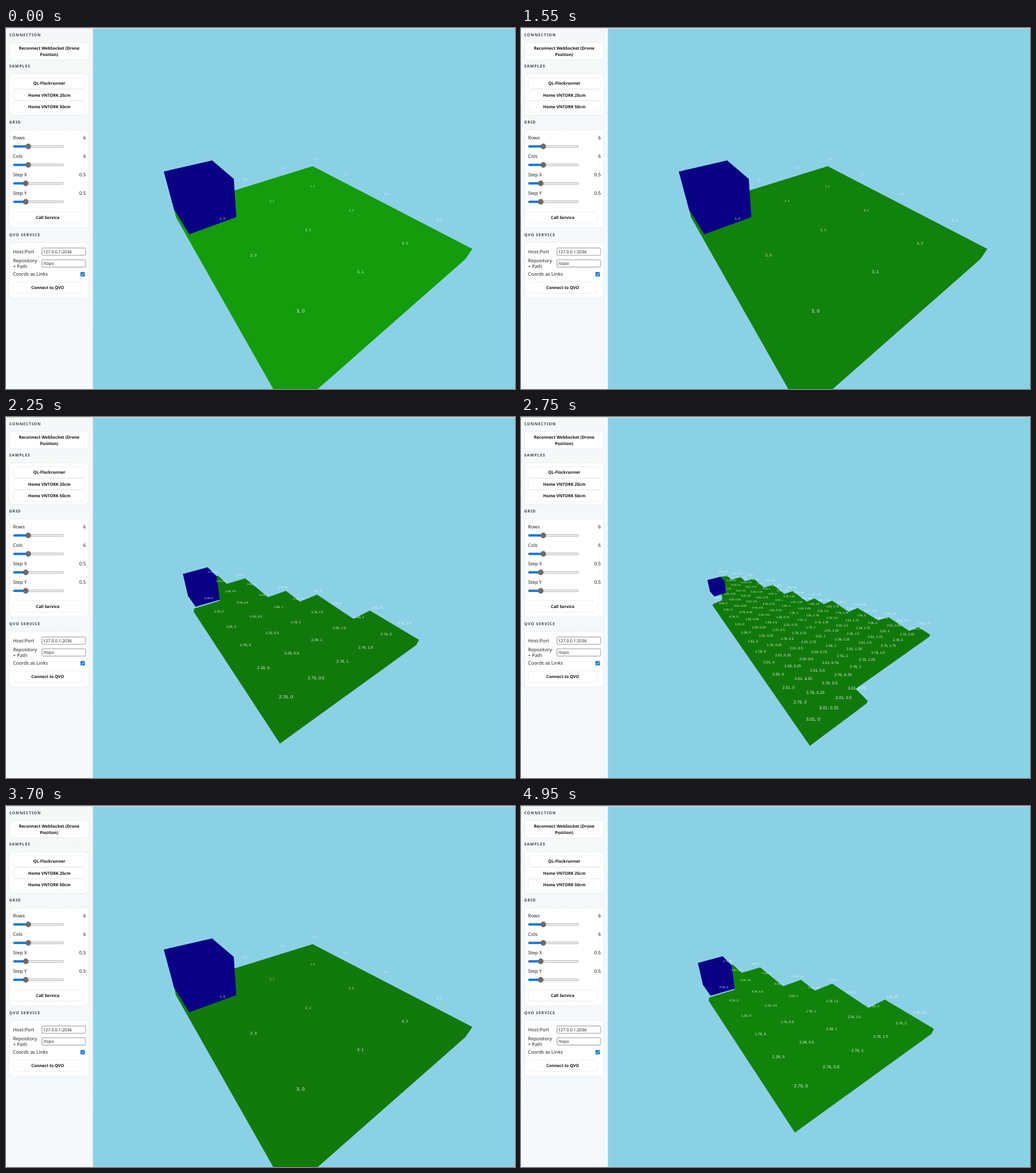
Recreate the animation shown at these times as an HTML page. Size 800x567 px, loop 5 s.

```html
<!DOCTYPE html>
<html lang="en">
<head>
<meta charset="utf-8">
<title>Grid viewer</title>
<style>
  html, body { margin: 0; width: 100%; height: 100%; overflow: hidden; background: #8bd1e6; }
  svg { display: block; width: 800px; height: 567px; }
  text { text-rendering: geometricPrecision; }

  .view { animation: 5s step-end infinite; }
  #wide { animation-name: wide; }
  #half { animation-name: half; }
  #fine { animation-name: fine; }
  @keyframes wide { 0%, 73% { visibility: visible } 32%, 94% { visibility: hidden } }
  @keyframes half { 0%, 52% { visibility: hidden } 32%, 94% { visibility: visible } }
  @keyframes fine { 0%, 73% { visibility: hidden } 52% { visibility: visible } }

  .floor { fill: #149c0c; animation: glow 5s linear infinite; }
  @keyframes glow {
    0% { fill: #149c0c }
    16% { fill: #16b20f }
    31% { fill: #11820b }
    45%, 67% { fill: #11790b }
    88% { fill: #117c0b }
    99%, 100% { fill: #11830b }
  }
  .cube { fill: #0a0086; }
  .coords { fill: #fff; fill-opacity: .88; font-family: "Liberation Sans", Arial, sans-serif; text-anchor: middle; }

  #panel { font: 7.5px "Noto Sans", sans-serif; fill: #222; }
  .head { font-size: 6.2px; font-weight: 600; letter-spacing: .8px; fill: #3c4248; }
  .btn { font-size: 6.5px; font-weight: 700; text-anchor: middle; fill: #111; }
  .num { text-anchor: end; }
  .entry { font-size: 6.6px; }
  .card, .key { fill: #fff; stroke: #e6ebef; stroke-width: .8; }
  .field { fill: #fff; stroke: #858585; stroke-width: .8; }
</style>
</head>
<body>
<svg viewBox="0 0 800 567">
  <defs><linearGradient id="side" x2="0" y2="1">
    <stop stop-color="#f5f8f8"/><stop offset="1" stop-color="#f4f9fd"/>
  </linearGradient></defs>
  <rect width="800" height="567" fill="#8bd1e6"/>

  <g class="view" id="wide">
    <path class="floor" d="M264 284L267 297 420 567H490L722 363 733 347 482 217 350 258z"/>
    <path class="cube" d="M248 225.500L324 208 358 237 362 297 288 324 264 285z"/>
    <g class="coords"></g>
  </g>
  <g class="view" id="half">
    <path class="floor" d="M295 306L295.500 301 336 288.500 325 252 333 249 347 262 376 253.500 412 283 440 273 462 290 489 279 546 317 572 304 649 350 645 358 430.500 513z"/>
    <path class="cube" d="M278 246.500L317 236 331 250 336 287 298 298 286 281z"/>
    <g class="coords"></g>
  </g>
  <g class="view" id="fine">
    <path class="floor" d="M301 296L302 293.500 316 288 313 251 324 249 331 256 345 251 352 258 366 254 382 268 396 263.500 414 278 427 273.500 449 290 461 285 476 294 489 288.500 515 306 529 300 562 319.500 577 314 610 336 625 330 643 342 642 345 526 427 545 446 543 450 454 516.500z"/>
    <g class="coords"></g>
    <path class="cube" d="M293 256L313 251 320 258 322 276 304 282 297 274z"/>
  </g>

  <g id="panel">
    <rect width="136.500" height="567" fill="url(#side)"/>
    <path d="M136.500 0V567" stroke="#d3e3ea"/>
  </g>
  <rect width="800" height="1" fill="#d9d8d4"/>
</svg>

<script>
const NS = 'http://www.w3.org/2000/svg';
const panel = document.querySelector('#panel');

function add(parent, tag, attrs, text) {
  const el = document.createElementNS(NS, tag);
  for (const key in attrs) el.setAttribute(key, attrs[key]);
  if (text !== undefined) el.textContent = text;
  return parent.appendChild(el);
}

// Projects grid cell (i, j), counted from the nearest corner, onto the stage.
function labels(id, o) {
  const group = document.querySelector(`#${id} .coords`);
  for (let j = 0; j < o.rows; j++) {
    const [from, to] = o.span(j);
    for (let i = from; i <= to; i++) {
      const w = 1 + o.w[0] * i + o.w[1] * j;
      const size = o.size / w;
      add(group, 'text', {
        x: ((o.x[0] + o.x[1] * i + o.x[2] * j) / w).toFixed(2),
        y: ((o.y[0] + o.y[1] * i + o.y[2] * j) / w + size * .36).toFixed(2),
        'font-size': size.toFixed(2)
      }, `${(o.first - o.step * j).toFixed(o.digits)}, ${i * o.step}`);
    }
  }
}

labels('wide', {
  rows: 4, first: 3, step: 1, digits: 0, size: 7.7,
  x: [463, 189.3, 25.2], y: [444, 4.5, 3.5], w: [.171, .255],
  span: j => [j > 2 ? 1 : 0, 3]
});
labels('half', {
  rows: 8, first: 2.76, step: .5, digits: 2, size: 7.2,
  x: [440, 83, 17.2], y: [439, .55, 6.17], w: [.073, .13],
  span: j => [j > 5 ? 1 : 0, [5, 5, 4, 4, 3, 2, 2, 1][j]]
});
labels('fine', {
  rows: 17, first: 3.01, step: .25, digits: 2, size: 7.2,
  x: [459, 44.4, 7.2], y: [474, 1.13, 1.96], w: [.0404, .063],
  span: j => [Math.min(2, Math.max(0, j - 12)), j ? Math.floor(11.3 - (j - 1) * .556) : 3]
});

const box = (cls, x, y, width, height, rx) => add(panel, 'rect', { class: cls, x, y, width, height, rx });
const write = (cls, x, y, text) => add(panel, 'text', { class: cls, x, y }, text);

function button(x, y, width, height, ...lines) {
  box('key', x, y, width, height, 5);
  const top = y + height / 2 + 2.4 - (lines.length - 1) * 4.7;
  lines.forEach((line, n) => write('btn', x + width / 2, top + n * 9.4, line));
}

function slider(y, name, value, knob) {
  write('', 11, y + 2.7, name);
  write('num', 125.5, y + 2.7, value);
  add(panel, 'rect', { x: 11.5, y: y + 12, width: 79, height: 3, rx: 1.5, fill: '#eee', stroke: '#aaa', 'stroke-width': .7 });
  add(panel, 'rect', { x: 11.5, y: y + 11.7, width: knob - 11.5, height: 3.5, rx: 1.5, fill: '#1779d8' });
  add(panel, 'circle', { cx: knob, cy: y + 13.5, r: 4.4, fill: '#6b6b6b' });
}

[['CONNECTION', 12.6], ['SAMPLES', 62.2], ['GRID', 149.6], ['QVO SERVICE', 326.6]]
  .forEach(([name, y]) => write('head', 5, y, name));
[[72, 65], [160, 154], [337, 87.5]].forEach(([y, h]) => box('card', 5.5, y, 124.5, h, 6));

button(5.5, 23, 124.5, 27, 'Reconnect WebSocket (Drone', 'Position)');
['QL-Flockrunner', 'Home VNTORK 25cm', 'Home VNTORK 50cm']
  .forEach((name, n) => button(11, 78 + n * 18.3, 114, 17.6, name));

slider(172.5, 'Rows', '6', 35);
slider(201.5, 'Cols', '6', 35);
slider(230.500, 'Step X', '0.5', 31);
slider(259.5, 'Step Y', '0.5', 31);
button(11, 288.5, 109, 17.6, 'Call Service');

write('', 11, 353.6, 'Host:Port');
write('', 11, 368, 'Repository');
write('', 11, 376.6, '+ Path');
write('', 11, 389.4, 'Coords as Links');
box('field', 56.5, 345.5, 68.5, 11.5, 1);
box('field', 56.5, 364, 68.5, 11.5, 1);
write('entry', 58.5, 353.7, '127.0.0.1:2036');
write('entry', 58.5, 372.2, '/topo');
add(panel, 'rect', { x: 117, y: 383.3, width: 7, height: 7, rx: 1.2, fill: '#1779d8' });
add(panel, 'path', { d: 'M118.500 387l1.500 1.600 2.900-3.700', fill: 'none', stroke: '#fff' });
button(11, 399, 109, 17.6, 'Connect to QVO');
</script>
</body>
</html>
```
